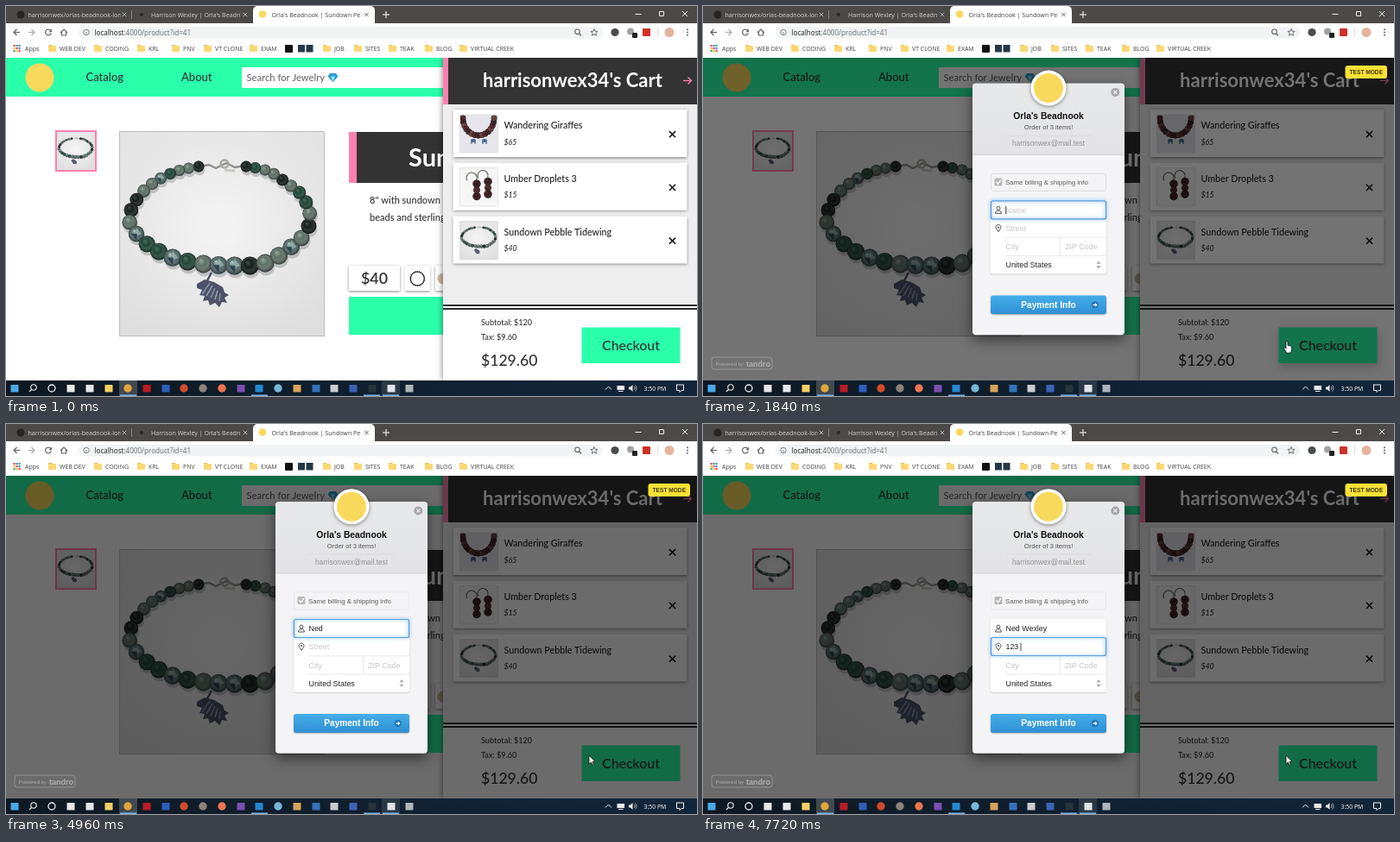
Animation of 800x452 px, one loop 8 s. Source, as an HTML page with a canvas:

```html
<!DOCTYPE html>
<html lang="en">
<head>
<meta charset="utf-8">
<title>Shop checkout</title>
<style>
html, body { margin: 0; width: 100%; height: 100%; overflow: hidden; background: #fff; }
canvas { display: block; width: 100vw; height: 100vh; }
</style>
</head>
<body>
<canvas id="stage"></canvas>
<script>
const W = 800, H = 452, LOOP = 8000;
const GREEN = '#2affaa', PINK = '#ff80b0', DARK = '#333', SUN = '#f8d95c';
const canvas = document.getElementById('stage');
const ctx = canvas.getContext('2d');

const page = (size, weight = 500) => `${weight} ${size}px Lato, sans-serif`;
const ui = size => `${size}px "Open Sans", sans-serif`;
const form = (size, weight = 400) => `${weight} ${size}px "Liberation Sans", Arial, sans-serif`;

// Value of the last [time, value] step that has been reached.
const at = (steps, t) => steps.reduce((v, s) => (t >= s[0] ? s[1] : v), steps[0][1]);

function rect(x, y, w, h, color, r = 0) {
  ctx.fillStyle = color;
  ctx.beginPath();
  ctx.roundRect(x, y, w, h, r);
  ctx.fill();
}
function frame(x, y, w, h, color, lw = 1, r = 0) {
  ctx.strokeStyle = color;
  ctx.lineWidth = lw;
  ctx.beginPath();
  ctx.roundRect(x, y, w, h, r);
  ctx.stroke();
}
function circle(x, y, r, color) {
  ctx.fillStyle = color;
  ctx.beginPath();
  ctx.arc(x, y, r, 0, 7);
  ctx.fill();
}
function ring(x, y, r, color, lw = 1, from = 0, to = 7) {
  ctx.strokeStyle = color;
  ctx.lineWidth = lw;
  ctx.beginPath();
  ctx.arc(x, y, r, from, to);
  ctx.stroke();
}
function trace(points) {
  ctx.beginPath();
  for (let i = 0; i < points.length; i += 2) ctx.lineTo(points[i], points[i + 1]);
}
function line(points, color, lw = 1) {
  trace(points);
  ctx.strokeStyle = color;
  ctx.lineWidth = lw;
  ctx.stroke();
}
function poly(points, color) {
  trace(points);
  ctx.closePath();
  ctx.fillStyle = color;
  ctx.fill();
}
function text(str, x, y, font, color, align = 'left') {
  ctx.font = font;
  ctx.fillStyle = color;
  ctx.textAlign = align;
  ctx.fillText(str, x, y);
}
function clipped(x, y, w, h, draw) {
  ctx.save();
  ctx.beginPath();
  ctx.rect(x, y, w, h);
  ctx.clip();
  draw();
  ctx.restore();
}
function shadow(blur, dy, color, draw) {
  const k = canvas.width / W;
  ctx.save();
  ctx.shadowBlur = blur * k;
  ctx.shadowOffsetY = dy * k;
  ctx.shadowColor = color;
  draw();
  ctx.restore();
}
function cross(x, y, r, color, lw) {
  line([x - r, y - r, x + r, y + r], color, lw);
  line([x + r, y - r, x - r, y + r], color, lw);
}
function gradient(x0, y0, x1, y1, from, to) {
  const g = ctx.createLinearGradient(x0, y0, x1, y1);
  g.addColorStop(0, from);
  g.addColorStop(1, to);
  return g;
}

// ---- browser window ----
function tabTitle(str, x, w, color) {
  clipped(x, 0, w, 20, () => text(str, x, 12.5, ui(7.1), color));
}
function browserTop() {
  rect(0, 0, W, 21, '#4c4a48');
  rect(286, 0, 141, 24, '#fff', [5, 5, 0, 0]);
  circle(17, 10, 4.5, '#262524');
  circle(157, 10, 2, '#2a2928');
  circle(297, 9.5, 4.3, SUN);
  tabTitle('harrisonwex/orlas-beadnook-long', 25.5, 107, '#d2d1d0');
  tabTitle("Harrison Wexley | Orla's Beadnook", 168, 103, '#d2d1d0');
  tabTitle("Orla's Beadnook | Sundown Pebble", 307.5, 103, '#444');
  cross(137, 10, 2.2, '#c8c7c6', 0.9);
  cross(277, 10, 2.2, '#c8c7c6', 0.9);
  cross(417.5, 10, 2.2, '#555', 0.9);
  line([145.5, 5, 145.5, 15], '#85827f');
  line([436, 10, 444, 10], '#e8e8e8', 1.2);
  line([440, 6, 440, 14], '#e8e8e8', 1.2);
  line([728.5, 9.5, 735.5, 9.5], '#eee');
  frame(756.5, 6.5, 5, 5, '#eee');
  cross(786, 9, 3, '#eee', 1);

  rect(0, 20, W, 40, '#fff');
  const ink = '#5f6368';
  line([16, 30.5, 9, 30.5], ink, 1.2);
  line([12.5, 27, 9, 30.5, 12.5, 34], ink, 1.2);
  line([26, 30.5, 33, 30.5], '#a9abae', 1.2);
  line([29.5, 27, 33, 30.5, 29.5, 34], '#a9abae', 1.2);
  ring(49, 30.5, 3.4, ink, 1.2, 0.3, 5.6);
  poly([53, 26.5, 53, 30.3, 49.3, 30.3], ink);
  line([63, 31, 67, 27, 71, 31], ink, 1.2);
  line([64.5, 30, 64.5, 34, 69.5, 34, 69.5, 30], ink, 1.2);
  rect(84, 24, 607, 13.5, '#f1f3f4', 7);
  ring(93, 30.5, 3.2, ink, 0.8);
  line([93, 30, 93, 32.5], ink, 0.8);
  text('localhost', 102.5, 33.6, ui(8.1), '#222');
  const x = 102.5 + ctx.measureText('localhost').width;
  text(':4000/product?id=41', x, 33.6, ui(8.1), '#666b70');
  ring(661.5, 29.8, 2.8, ink, 1.1);
  line([663.5, 32, 666, 34.5], ink, 1.2);
  const star = [];
  for (let i = 0; i < 11; i++) {
    const a = i * Math.PI / 5 - Math.PI / 2, r = i % 2 ? 1.9 : 4.3;
    star.push(681 + r * Math.cos(a), 30.8 + r * Math.sin(a));
  }
  line(star, ink, 0.9);
  circle(705, 30.5, 4.6, '#4a4d50');
  circle(723, 29.5, 4, '#a0a3a6');
  rect(725, 31, 6, 6, '#222', 1);
  rect(737, 26, 9, 9, '#cf3128', 1);
  line([754.5, 25, 754.5, 36], '#ddd');
  circle(768, 30.5, 5.5, '#e5b39c');
  for (let i = -1; i < 2; i++) circle(789, 30.5 + i * 3.3, 1, ink);

  const dots = ['#e0524a', '#4c87e8', '#46a75b', '#eebc3c'];
  for (let i = 0; i < 9; i++) rect(8.5 + i % 3 * 3, 45 + (i / 3 | 0) * 3, 2.2, 2.2, dots[i % 4]);
  text('Apps', 22, 51.6, ui(7), '#444');
  const marks = [['WEB DEV', 62], ['CODING', 115], ['KRL', 165], ['PNV', 205], ['VT CLONE', 242],
    ['EXAM', 295], ['JOB', 380], ['SITES', 416], ['TEAK', 456], ['BLOG', 498], ['VIRTUAL CREEK', 538]];
  for (const [name, left] of marks) {
    rect(left - 13, 45, 4.5, 3, '#e9bd51', 1);
    rect(left - 13, 46, 9, 7, '#fbd874', 1);
    text(name, left, 51.6, ui(7), '#444');
  }
  rect(323, 45, 9, 9, '#111', 1);
  rect(338, 45, 8, 8.5, '#253847');
  rect(347.5, 45, 8, 8.5, '#253847');
}

function taskbar() {
  rect(0, 434, W, 18, gradient(0, 0, W, 0, '#0e1822', '#12263a'));
  rect(131, 434, 21, 18, '#414950');
  rect(435, 434, 21, 18, '#2b3844');
  for (const x of [132, 284, 414, 436]) rect(x, 450.5, 19, 1.5, '#76b9ed');
  ring(32, 442, 3.2, '#eee', 1.1);
  line([29.6, 444.5, 27, 447], '#eee', 1.2);
  ring(53, 443, 4, '#eee', 1.3);
  const squares = [[10, '#4aa8e8'], [75, '#e8e8e8'], [97, '#e4e8ec'], [119, '#f4ce67'], [163, '#b81d24'],
    [185, '#2c5fb8'], [272, '#7a4fae'], [293, '#2488d0'], [337, '#d8a35a'], [359, '#3572b8'],
    [380, '#c9cdd0'], [402, '#3b62b5'], [424, '#28333a'], [446, '#dfe4e8'], [467, '#aeb5ba']];
  for (const [x, c] of squares) rect(x - 4.5, 439, 9, 8.5, c, 0.5);
  const rounds = [[141, '#dfa63b'], [206, '#cf4b2c'], [228, '#8b8378'], [250, '#ed7550'], [315, '#77b6d8']];
  for (const [x, c] of rounds) circle(x, 443, 4.7, c);
  line([694, 444.5, 697.5, 441, 701, 444.5], '#eee', 1);
  rect(707.5, 440, 8.5, 5, '#eee');
  line([709, 446.5, 714.5, 446.5], '#eee', 1);
  poly([721, 441.5, 723, 441.5, 725.5, 439, 725.5, 447, 723, 444.5, 721, 444.5], '#eee');
  ring(725, 443, 3, '#ddd', 0.7, -0.8, 0.8);
  ring(725, 443, 5, '#ddd', 0.7, -0.8, 0.8);
  text('3:50 PM', 738.5, 445.6, ui(6.9), '#fff');
  line([776.5, 439, 784.5, 439, 784.5, 445.5, 782, 445.5, 780, 447.5, 780, 445.5, 776.5, 445.5, 776.5, 438.5], '#eee', 1);
}

// ---- product pictures ----
function bead(x, y, r, color, shine = 0.35) {
  circle(x, y, r, color);
  const g = ctx.createRadialGradient(x - r * 0.3, y - r * 0.4, 0, x, y, r);
  g.addColorStop(0, `rgba(235,250,240,${shine})`);
  g.addColorStop(0.45, 'rgba(255,255,255,0)');
  g.addColorStop(1, 'rgba(0,0,0,.5)');
  circle(x, y, r, g);
}

// String of the bracelet from one end of the clasp to the other, and its beads in order.
const STRING = [92, 41, 68, 46, 44, 57, 26, 72, 14, 91, 13, 108, 30, 129, 60, 146, 98, 154,
  145, 156, 169, 153, 194, 138, 215, 119, 221, 98, 212, 75, 194, 60, 172, 46, 147, 41];
const KINDS = 'kssgcsskkscggcgsccksscsksggskssgk';
const TONES = { k: '#131c19', s: '#5d7066', g: '#1d4535', c: '#4c6866' };

function stringPoint(u) {
  const last = STRING.length / 2 - 1;
  const i = Math.min(u * last | 0, last - 1), f = u * last - i;
  const axis = k => {
    const [a, b, c, d] = [-1, 0, 1, 2].map(o => STRING[2 * Math.max(0, Math.min(last, i + o)) + k]);
    return b + f * ((c - a) + f * ((2 * a - 5 * b + 4 * c - d) + f * (3 * b - a - 3 * c + d))) / 2;
  };
  return [axis(0), axis(1)];
}
const beadRadius = y => 6.4 + 4.1 * (y - 41) / 115;

// Spaces the beads evenly in units of their own radius; near beads are larger.
function layBeads() {
  const samples = [];
  let run = 0, prev = stringPoint(0);
  for (let i = 0; i <= 600; i++) {
    const p = stringPoint(i / 600);
    run += Math.hypot(p[0] - prev[0], p[1] - prev[1]) / beadRadius(p[1]);
    samples.push([run, ...p]);
    prev = p;
  }
  return [...KINDS].map((kind, i) => {
    const [, x, y] = samples.find(s => s[0] >= run * i / (KINDS.length - 1) - 1e-6);
    return { kind, x, y, r: beadRadius(y) };
  });
}
const BEADS = layBeads();

// The bracelet picture in a 238 unit square.
function bracelet(x, y, size) {
  ctx.save();
  ctx.translate(x, y);
  ctx.scale(size / 238, size / 238);
  rect(0, 0, 238, 238, gradient(0, 0, 0, 238, '#e4e4e5', '#dededf'));
  const glow = ctx.createRadialGradient(115, 110, 20, 115, 110, 150);
  glow.addColorStop(0, 'rgba(244,244,244,.9)');
  glow.addColorStop(1, 'rgba(240,240,240,0)');
  rect(0, 0, 238, 238, glow);
  for (const b of BEADS) circle(b.x + 1, b.y + 4, b.r, 'rgba(90,95,100,.3)');
  line([94, 41, 104, 39, 112, 43, 124, 37, 134, 42, 146, 40], '#8f908c', 2.4);
  ring(122, 38, 4.5, '#a9a9a4', 2.5);
  line([122, 45, 134, 46], '#c9c9c5', 3);
  for (const { kind, x: bx, y: by, r } of BEADS) {
    bead(bx, by, r, TONES[kind], kind === 'c' ? 0.7 : kind === 's' ? 0.4 : 0.22);
    if (kind !== 'c') continue;
    poly([bx, by - r * 0.8, bx + r * 0.6, by, bx, by + r * 0.3], 'rgba(178,205,195,.6)');
    poly([bx - r * 0.6, by, bx, by + r * 0.8, bx + r * 0.1, by], 'rgba(25,45,65,.7)');
  }
  line([107, 164, 101, 175], '#45506a', 2.5);
  poly([90, 177, 99, 172, 110, 175, 120, 181, 122, 187, 127, 190, 122, 193, 125, 199, 119, 198,
    116, 204, 111, 199, 105, 202, 103, 196, 97, 197, 99, 191, 93, 190, 96, 184, 90, 182], '#4c5268');
  for (let i = 0; i < 5; i++) line([96 + i * 5, 189 + i * 2, 105 + i * 3, 176 + i * 3], i % 2 ? '#a6a6bb' : '#8794ae', 1.4);
  ctx.restore();
}
function necklace() {
  rect(525, 126, 45, 44, '#e6e6ec');
  for (let i = 0; i < 15; i++) {
    const a = Math.PI * i / 14;
    bead(547 - 18 * Math.cos(a), 130 + 20 * Math.sin(a), 3.4, ['#4a191d', '#2c1216', '#5e3530'][i % 3], 0.2);
  }
  for (const x of [541, 554]) {
    rect(x - 3, 154, 6, 4, '#4d6a92', 2);
    line([x - 2, 157, x - 2, 160], '#4d6a92', 1.3);
    line([x + 2, 157, x + 2, 160], '#4d6a92', 1.3);
  }
}
function earrings() {
  rect(525, 187.5, 45, 44, '#f6f6f6');
  for (const [x, y] of [[545, 206], [558, 203.5]]) {
    ring(x - 6, y - 7, 6, '#5d5d58', 1.1, 2.6, 6.2);
    line([x - 0.2, y - 7, x, y - 3], '#5d5d58', 1.1);
    for (let i = 0; i < 3; i++) bead(x, y + i * 7.3, i === 1 ? 3.8 : 4.6, i === 1 ? '#42191c' : '#2f0d12', 0.2);
  }
}

// ---- shop page ----
function shopPage() {
  rect(0, 60, W, 374, '#fff');
  rect(0, 60, W, 45, GREEN);
  circle(39, 83, 16.5, SUN);
  text('Catalog', 92.5, 87.3, page(13), DARK);
  text('About', 203, 87.3, page(13), DARK);
  rect(273, 71, 240, 24, '#fff');
  text('Search for Jewelry', 278.5, 87, page(11.2), '#6b6b6b');
  poly([375, 78, 382, 78, 384.5, 81.5, 378.5, 88.5, 372.5, 81.5], '#2f9fd0');
  poly([376, 81.5, 381, 81.5, 378.5, 88.5], '#8fdcf2');

  bracelet(59, 146, 44);
  frame(58, 145, 46, 46, PINK, 2);
  bracelet(131, 145, 238);
  frame(131.5, 145.5, 237, 237, '#bdbdbd');

  rect(397, 146, 9, 59, PINK);
  rect(406, 146, 120, 59, DARK);
  text('Sundown', 466, 186, page(29, 700), '#fff');
  text('8" with sundown pebble', 421, 228.8, page(11), DARK);
  text('beads and sterling', 421, 249.3, page(11), DARK);
  for (const [x, w] of [[397, 59], [461.5, 29.5], [497, 30]]) {
    shadow(3, 1, 'rgba(0,0,0,.45)', () => rect(x, 301, w, 29, '#fff'));
  }
  text('$40', 426.5, 321.8, page(17.8, 600), DARK, 'center');
  for (let i = 0; i < 24; i++) {
    const a = i * Math.PI / 12;
    circle(476.3 + 8 * Math.cos(a), 316 + 8 * Math.sin(a), 0.95, '#1c1c1c');
  }
  circle(506, 316, 6.5, '#c7b7a0');
  rect(397, 337, 140, 44, GREEN);
}

function cartItem(y, name, price, picture) {
  shadow(3.5, 1, 'rgba(0,0,0,.5)', () => rect(517.5, y, 271, 55, '#fff'));
  picture();
  frame(525.5, y + 6, 44, 44, '#ddd', 0.7);
  text(name, 576.5, y + 22, page(10.7), '#222');
  text(price, 576.5, y + 40.5, 'italic ' + page(8.7), '#333');
  cross(771.5, y + 28.7, 3.6, '#111', 1.5);
}
function cart(hover) {
  clipped(480, 60, 320, 374, () => {
    shadow(7, 0, 'rgba(0,0,0,.55)', () => rect(506, 60, 300, 374, '#eee'));
    rect(506, 60, 6, 54, PINK);
    rect(512, 60, 288, 54, DARK);
    text("harrisonwex34's Cart", 656, 94, page(22, 700), '#fff', 'center');
    line([784, 86.5, 793.5, 86.5], PINK, 1.3);
    line([789.5, 82.5, 793.5, 86.5, 789.5, 90.5], PINK, 1.3);
    cartItem(120, 'Wandering Giraffes', '$65', necklace);
    cartItem(181.7, 'Umber Droplets 3', '$15', earrings);
    cartItem(243.5, 'Sundown Pebble Tidewing', '$40', () => bracelet(525, 249, 45));
    rect(506, 346, 294, 88, '#fff');
    rect(506, 346, 294, 2, '#2b2b2b');
    rect(506, 350, 294, 2, '#2b2b2b');
    text('Subtotal: $120', 550, 369.7, page(9.1), DARK);
    text('Tax: $9.60', 550, 387.3, page(9.1), DARK);
    text('$129.60', 550, 416.8, page(17.6), DARK);
    const button = () => rect(666.5, 372.5, 114, 41.5, GREEN);
    if (hover) shadow(10, 4, 'rgba(0,0,0,.2)', button);
    else button();
    text('Checkout', 723.5, 398.5, page(15.9), DARK, 'center');
  });
}

// ---- payment dialog ----
function focusBox(y, amount) {
  if (!amount) return;
  ctx.save();
  ctx.globalAlpha = amount;
  shadow(4, 0, '#4a9cec', () => frame(333.5, y + 0.5, 133, 21, '#5a9ddd', 1.2, 2));
  ctx.restore();
}
function field(value, hint, y, caret) {
  text(value || hint, 350.5, y, form(8.9), value ? '#222' : '#c6c6ca');
  if (caret) {
    const w = value ? ctx.measureText(value).width : 0;
    rect(350.3 + w, y - 8, 0.8, 9.5, '#222');
  }
}
function dialog(t) {
  const name = at([[0, ''], [3720, 'N'], [4000, 'Ned'], [4320, 'Ned '], [5240, 'Ned W'],
    [5560, 'Ned We'], [6200, 'Ned Wexley']], t);
  const street = at([[0, ''], [7120, '12'], [7400, '123'], [7720, '123 ']], t);
  const nameCaret = at([[0, 1], [2480, 0], [2760, 1], [3400, 0], [3720, 1], [4960, 0], [5240, 1], [6480, 0]], t);

  ctx.save();
  if (t < 2160) ctx.translate(0, -0.6);
  shadow(16, 5, 'rgba(0,0,0,.55)', () => rect(312, 90.3, 176, 291.5, '#f4f4f6', 4));
  rect(312, 90.3, 176, 83, gradient(0, 90, 0, 173, '#e8e9eb', '#e3e3e6'), [4, 4, 0, 0]);
  line([312, 173, 488, 173], '#cfcfd3', 0.8);
  line([350, 151, 450, 151], '#d8d8db', 0.7);
  shadow(4, 1, 'rgba(0,0,0,.45)', () => circle(400, 95.7, 20.5, '#fff'));
  circle(400, 95.7, 17, SUN);
  circle(477.3, 100.5, 5, '#a6a7aa');
  cross(477.3, 100.5, 1.9, '#f2f2f2', 1.2);
  text("Orla's Beadnook", 400, 131.8, form(10.3, 700), '#111', 'center');
  text('Order of 3 items!', 400, 144, form(7.6), '#555', 'center');
  text('harrisonwex@mail.test', 400, 162.8, form(8.3), '#929296', 'center');

  frame(333.5, 195, 133, 20, t < 2160 ? '#d8d8db' : '#e6e6e9', 0.8, 2);
  rect(337.5, 200, 9, 9, '#b9b9bc', 1.5);
  line([339.5, 204.5, 341.5, 206.7, 345, 202], '#fff', 1.4);
  text('Same billing & shipping info', 350, 207.8, form(7.8), '#5c5c60');

  shadow(1.5, 0.5, 'rgba(0,0,0,.25)', () => rect(333, 226, 134, 85, '#fff', 2));
  for (const y of [247.7, 268.8, 290]) line([350, y, 467, y], '#e4e4e7', 0.8);
  line([413.5, 269, 413.5, 290], '#e4e4e7', 0.8);
  focusBox(226, at([[0, 1], [6480, 0.45], [6800, 0]], t));
  focusBox(247, at([[0, 0], [6480, 0.5], [6800, 1]], t));
  ring(342, 235, 2, '#444', 0.9);
  line([338.5, 241, 339.2, 238.7, 341, 237.7, 343, 237.7, 344.8, 238.7, 345.5, 241, 338.5, 241], '#444', 0.9);
  ring(342, 257, 3, '#444', 0.9, 2.6, 6.82);
  line([339.4, 258.4, 342, 262.3, 344.6, 258.4], '#444', 0.9);
  circle(342, 257, 1, '#444');
  field(name, 'Name', 240.4, nameCaret);
  field(street, 'Street', 261.4, t >= 6480);
  field('', 'City', 282.6);
  text('ZIP Code', 419, 282.6, form(8.9), '#c6c6ca');
  field('United States', '', 303.8);
  poly([455.5, 299.3, 460.5, 299.3, 458, 296], '#a9a9ad');
  poly([455.5, 301.7, 460.5, 301.7, 458, 305], '#a9a9ad');

  shadow(1.5, 0.7, 'rgba(0,0,0,.4)', () => rect(333, 336, 134, 21.7, gradient(0, 336, 0, 358, '#45aee8', '#2f8fd5'), 3));
  text('Payment Info', 400, 350.2, form(10.1, 700), '#fff', 'center');
  circle(453.8, 347, 4.2, '#2377b8');
  line([451.5, 347, 455.5, 347], '#fff', 1.3);
  poly([454, 344.7, 456.7, 347, 454, 349.3], '#fff');
  ctx.restore();
}
function checkout(t) {
  rect(0, 60, W, 374, `rgba(0,0,0,${t < 2160 ? 0.55 : 0.58})`);
  frame(10, 407, 70, 14, 'rgba(255,255,255,.25)', 1, 3);
  text('Powered by', 14.5, 416.5, form(6.2), '#aaa');
  text('tandro', 50, 417.5, form(9, 700), '#b0b0b0');
  rect(743.5, 69, 48.5, 15, '#fbe136', 3);
  text('TEST MODE', 767.8, 78.9, form(6.6, 700), '#403a12', 'center');
  dialog(t);
}

// ---- pointer ----
const ARROW = [0, 0, 0, 10, 2.3, 8, 4, 11.6, 5.4, 11, 3.9, 7.5, 6.8, 7.3];
const HAND = [3, 1, 4, 0.3, 5, 1, 5, 5.3, 7, 5.5, 9.3, 6.5, 9.7, 9, 8.6, 14, 3.6, 14, 0.5, 8.5, 1.2, 7.7, 3, 9];
function pointer(t) {
  const spot = at([[0, null], [600, [ARROW, 699, 279]], [920, [ARROW, 667, 348]],
    [1240, [HAND, 672, 388]], [2160, [ARROW, 675, 384]]], t);
  if (!spot) return;
  const [shape, x, y] = spot;
  ctx.save();
  ctx.translate(x, y);
  poly(shape, '#fff');
  line([...shape, shape[0], shape[1]], '#111', 0.8);
  ctx.restore();
}

function resize() {
  const k = Math.max(1, window.devicePixelRatio || 1);
  canvas.width = W * k;
  canvas.height = H * k;
}
function draw(now) {
  const t = now % LOOP;
  ctx.setTransform(canvas.width / W, 0, 0, canvas.height / H, 0, 0);
  shopPage();
  cart(t >= 1560 && t < 2160);
  if (t >= 1840) checkout(t);
  browserTop();
  taskbar();
  pointer(t);
}

resize();
window.addEventListener('resize', resize);
const start = performance.now();
function tick() {
  draw(performance.now() - start);
  requestAnimationFrame(tick);
}
tick();
</script>
</body>
</html>
```
